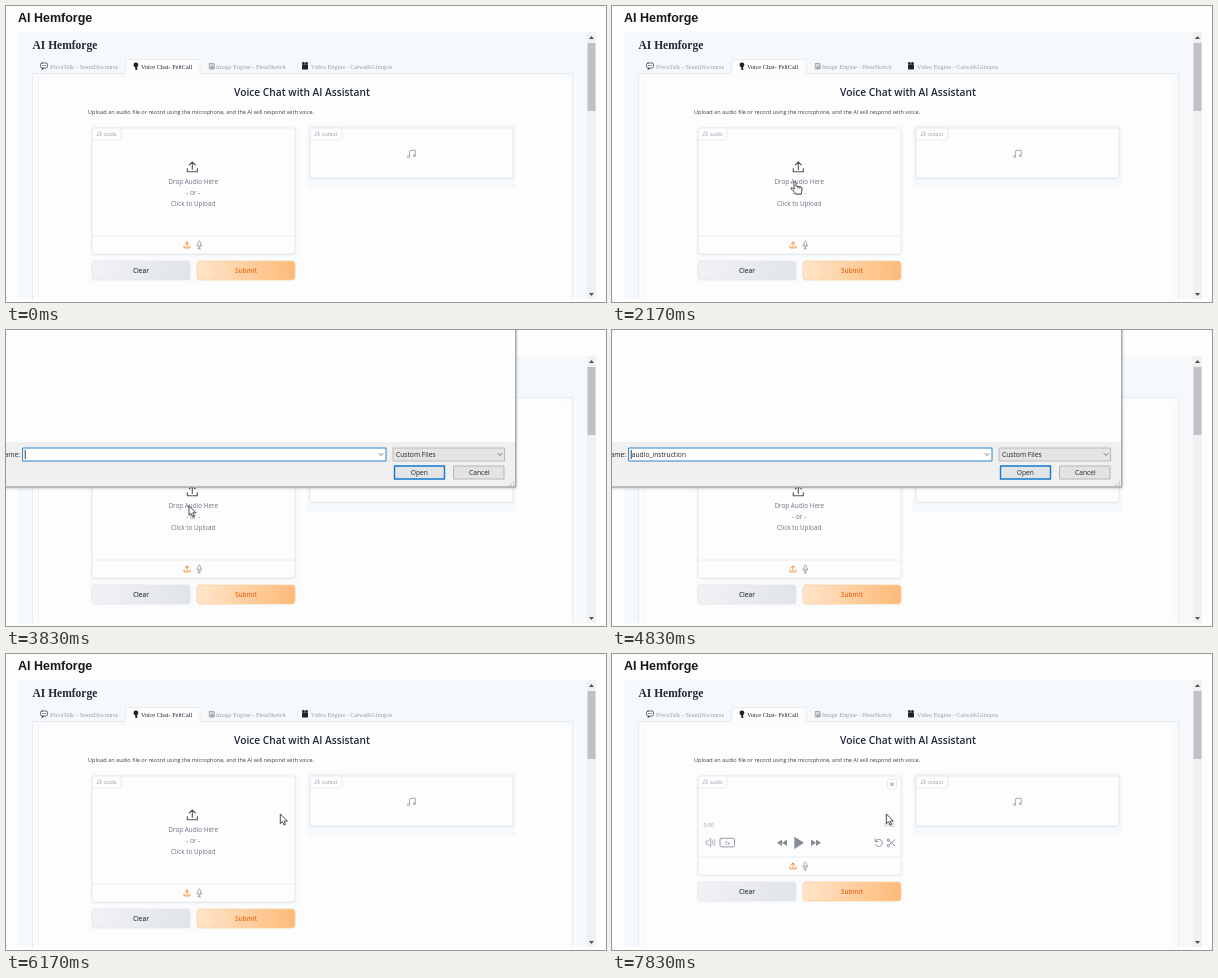
An HTML page with a canvas that plays this animation: 600x296 px, repeating every 8 s.

```html
<!DOCTYPE html>
<html lang="en">
<head>
<meta charset="utf-8">
<title>Voice chat demo</title>
<style>
html, body { margin: 0; width: 100%; height: 100%; overflow: hidden; background: #fdfdfe; }
canvas { display: block; width: 600px; height: 296px; }
</style>
</head>
<body>
<canvas id="stage"></canvas>
<script>
const W = 600, H = 296, LOOP = 8000;
const SANS = '"Open Sans", "Noto Sans", sans-serif';
const SERIF = '"Liberation Serif", "Noto Serif", serif';
const ARIAL = '"Liberation Sans", sans-serif';
const GRAY = '#9a9eaa', ORANGE = '#f08a24', LINE = '#e3e7ec';

const canvas = document.getElementById('stage');
const c = canvas.getContext('2d');
const scale = window.devicePixelRatio || 1;
canvas.width = W * scale;
canvas.height = H * scale;

function text(str, x, y, size, color, opt = {}) {
  c.font = `${opt.weight || 400} ${size}px ${opt.family || SANS}`;
  c.textAlign = opt.align || 'left';
  c.fillStyle = color;
  c.fillText(str, x, y);
}

function rect(x, y, w, h, fill) {
  c.fillStyle = fill;
  c.fillRect(x, y, w, h);
}

function box(x, y, w, h, r, fill, stroke, lw = 1) {
  c.beginPath();
  c.roundRect(x, y, w, h, r);
  if (fill) { c.fillStyle = fill; c.fill(); }
  if (stroke) { c.strokeStyle = stroke; c.lineWidth = lw; c.stroke(); }
}

function stroke(path, color, lw = 1) {
  c.strokeStyle = color;
  c.lineWidth = lw;
  c.lineCap = c.lineJoin = 'round';
  c.stroke(new Path2D(path));
}

function fill(path, color) {
  c.fillStyle = color;
  c.fill(new Path2D(path));
}

function at(x, y, k, draw) {
  c.save();
  c.translate(x, y);
  c.scale(k, k);
  draw();
  c.restore();
}

function dot(x, y, r, color) {
  c.beginPath();
  c.arc(x, y, r, 0, Math.PI * 2);
  c.fillStyle = color;
  c.fill();
}

function ring(x, y, r, color, lw) {
  c.beginPath();
  c.arc(x, y, r, 0, Math.PI * 2);
  c.strokeStyle = color;
  c.lineWidth = lw;
  c.stroke();
}

// Icons, centred on (x, y)
function note(x, y, k) {
  at(x, y, k, () => {
    stroke('M-2 3V-3.2L4 -4V2', GRAY, 0.9);
    ring(-3.1, 3, 1.1, GRAY, 0.9);
    ring(2.9, 2, 1.1, GRAY, 0.9);
  });
}

function upload(x, y, k, color, lw) {
  at(x, y, k, () => stroke('M0 2.5V-5M-3 -2.2L0 -5L3 -2.2M-5 1.5V4.8H5V1.5', color, lw));
}

function mic(x, y) {
  box(x - 1.2, y - 3.8, 2.4, 4.8, 1.2, null, GRAY, 0.8);
  stroke(`M${x - 2.5} ${y - 0.5}a2.5 2.6 0 0 0 5 0M${x} ${y + 2.2}v1.6M${x - 1.3} ${y + 3.8}h2.6`, GRAY, 0.8);
}

function tabIcons() {
  box(34.5, 57, 7, 5, 1.5, '#fff', '#444', 0.8);
  fill('M36 62L35.5 64.5L38.5 62Z', '#444');
  for (let i = 0; i < 3; i++) dot(36.3 + i * 1.7, 59.5, 0.5, '#333');
  fill('M128 57Q132.5 55.5 132.3 59.5L131.2 61V64H129.3V61.5Q126.8 60.5 128 57Z', '#222');
  box(203.3, 57.5, 5, 5.5, 0.5, '#d9dade', '#999', 0.8);
  fill('M204 62.5L206 59.5L208 62.5Z', '#999');
  box(296, 58.5, 6, 5, 0.8, '#222');
  dot(297.4, 57.5, 1.4, '#222');
  dot(300.5, 57.5, 1.4, '#222');
}

function frame() {
  rect(0, 0, W, H, '#fdfdfe');
  text('AI Hemforge', 12, 15.5, 12.5, '#18181c', { weight: 700, family: ARIAL });
  rect(12, 26, 569, 267, '#f6f9fc');
  text('AI Hemforge', 26.5, 43, 11.5, '#1f2937', { weight: 700, family: SERIF });

  rect(26.5, 67, 540, 226, '#fafbfd');
  rect(32, 72, 529, 221, '#fdfdfe');
  stroke('M26.5 293V67.5H566.5V293', LINE, 0.8);
  stroke('M32.5 293V72', '#eff2f6', 0.8);
  box(119.5, 53.5, 75, 14.5, [2, 2, 0, 0], '#fdfdfe');
  stroke('M119.5 67V55.5q0 -2 2 -2H192q2 0 2 2V67', LINE, 0.8);
  tabIcons();
  const tab = (s, x, color) => text(s, x, 62.5, 6.25, color, { family: SERIF });
  tab('PivraTalk - SeamDiscourse', 44, GRAY);
  tab('Voice Chat- FeltCall', 135, '#1f2937');
  tab('Image Engine - PleatSketch', 210, GRAY);
  tab('Video Engine - CatwalkGlimpse', 305, GRAY);

  rect(581, 26, 9, 267, '#f1f1f2');
  rect(581.5, 37, 8, 68, '#c1c1c3');
  fill('M583 33L585.5 30L588 33Z', '#505050');
  fill('M583 287L585.5 290L588 287Z', '#505050');

  text('Voice Chat with AI Assistant', 296, 90, 10.2, '#1f2937', { weight: 600, align: 'center' });
  text('Upload an audio file or record using the microphone, and the AI will respond with voice.',
    82, 108, 5.56, '#374151');
}

function block(x, y, w, h, label, labelW) {
  c.save();
  c.shadowColor = 'rgba(0,0,0,.1)';
  c.shadowBlur = 2 * scale;
  c.shadowOffsetY = 0.5 * scale;
  box(x, y, w, h, 2.5, '#fdfdfe');
  c.restore();
  box(x, y, w, h, 2.5, null, LINE, 0.8);
  box(x, y, labelW, 12, [2.5, 0, 2.5, 0], '#fdfdfe', LINE, 0.8);
  note(x + 7, y + 6, 0.5);
  text(label, x + 12, y + 7.7, 4.85, GRAY);
}

function button(x, y, label, from, to, edge, color) {
  const g = c.createLinearGradient(x, y, x + 98, y + 19);
  g.addColorStop(0, from);
  g.addColorStop(1, to);
  box(x, y, 98, 19, 3, g, edge, 0.8);
  text(label, x + 49, y + 11.8, 6.4, color, { weight: 600, align: 'center' });
}

function dropZone() {
  upload(186.3, 161, 1, '#4b5563', 1.1);
  const line = (s, y) => text(s, 187.2, y, 6.35, '#6b7280', { align: 'center' });
  line('Drop Audio Here', 178.3);
  line('- or -', 189);
  line('Click to Upload', 199.7);
}

function uploading() {
  text('Uploading 1 file...', 187, 152.8, 6.45, '#4b5563', { align: 'center' });
  ring(150.3, 163.2, 2.7, ORANGE, 1.1);
  text('audio_instruction.mp3', 156, 165.3, 6.5, GRAY);
}

function player() {
  box(275.5, 125.5, 9, 9.5, 1.5, '#fdfdfe', LINE, 0.8);
  stroke('M278.8 129l2.6 2.6M281.4 129l-2.6 2.6', '#6b7280', 0.8);
  text('0:00', 91.5, 173.3, 5.2, GRAY);
  text('0:00', 282.5, 173.3, 5.2, GRAY, { align: 'right' });
  stroke('M94.5 187h1.7l2.6 -2.4v8l-2.6 -2.4h-1.7zM100.4 186.7q1.3 1.8 0 3.7M102 185.3q2.2 3.3 0 6.5', GRAY, 0.8);
  box(108, 184.3, 14.5, 8.6, 1.5, null, '#8b909c', 0.9);
  text('1x', 115.2, 190.5, 5, '#6b7280', { align: 'center' });
  fill('M170 185.5V192L165 188.8ZM175 185.5V192L170 188.8Z', '#868b98');
  fill('M182.3 182.7V195L192 188.8Z', '#868b98');
  fill('M199 185.5V192L204 188.8ZM204 185.5V192L209 188.8Z', '#868b98');
  stroke('M263.3 185v2.6h2.6M263.6 187.3a3.6 3.6 0 1 1 0 3.2', '#868b98', 0.9);
  stroke('M277.5 187L282.8 191.8M277.5 190.6L282.8 185.6', '#868b98', 0.9);
  ring(276.4, 186, 1.2, '#868b98', 0.9);
  ring(276.4, 191.6, 1.2, '#868b98', 0.9);
}

function app(t) {
  frame();
  const bottom = t < 6500 ? 248 : t < 7830 ? 212 : 221;
  box(82.5, 118.5, 210, bottom - 89.5, 3, '#f9fbfd');
  block(86, 122, 203, bottom - 122, 'audio', 29);
  stroke(`M86 ${bottom - 18}H289`, LINE, 0.8);
  upload(181, bottom - 9, 0.6, ORANGE, 1.5);
  mic(193.3, bottom - 9);
  button(86, bottom + 7, 'Clear', '#f1f2f4', '#e1e4e8', '#e1e4e9', '#374151');
  button(191, bottom + 7, 'Submit', '#ffe6cc', '#fdb976', '#fbcf9f', '#ea6a1c');
  (t < 6500 ? dropZone : t < 7830 ? uploading : player)();

  box(300.5, 118.5, 209, 64, 3, '#f6f9fc');
  block(304, 122, 203, 50, 'output', 32);
  note(405.5, 147.8, 0.95);
}

function dialog(t) {
  c.save();
  c.shadowColor = 'rgba(0,0,0,.25)';
  c.shadowBlur = 3 * scale;
  rect(-5, -5, 515, 162.5, '#f0f0f1');
  c.restore();
  rect(0, 0, 509.5, 112, '#fdfdfe');
  stroke('M-2 157H509.8V-2', '#8c8c90', 1);

  if (t >= 3500) text('File name:', 14, 126.7, 6.7, '#222', { align: 'right' });
  box(17, 118, 363, 13, 0, '#fff', '#2f83c8', 1);
  box(387.5, 118, 111, 13, 0, '#e4e4e5', '#b4b4b6', 0.9);
  box(388.5, 136, 50, 13, 0, '#e3e4e6', '#1379d0', 1.4);
  box(448, 136, 50, 13, 0, '#e3e3e4', '#b0b0b2', 0.9);
  stroke('M373 123.5l2 2l2 -2M492 123.5l2 2l2 -2', '#555', 0.8);
  text('Custom Files', 390, 126.7, 6.7, '#222');
  text('Open', 413.3, 144.5, 6.7, '#222', { align: 'center' });
  text('Cancel', 473.3, 144.5, 6.7, '#222', { align: 'center' });
  for (let i = 0; i < 3; i++)
    for (let j = 0; j <= i; j++) rect(503 + i * 2, 155 - j * 2, 1, 1, '#b5b5b8');

  if (t >= 4830) text('audio_instruction', 19.8, 126.9, 6.7, '#222');
  const blinkOff = (t >= 4330 && t < 4830) || (t >= 5330 && t < 5670);
  if (!blinkOff) rect(18.8, 120, 0.8, 9, '#111');
}

function arrow(x, y) {
  at(x, y, 1, () => {
    const p = 'M0 0V9.4L2.2 7.4L3.7 10.8L5.2 10.1L3.8 6.8H6.7Z';
    fill(p, '#fff');
    stroke(p, '#222', 0.8);
  });
}

function hand(x, y) {
  at(x, y, 1, () => {
    const p = 'M-1 1q1 -1.6 2 0V5l5 1q1.4 .4 1.2 2L6.5 10.5V13H0V11.5L-4 7.8q-.3 -1.6 1.3 -1L-1 8Z';
    fill(p, '#fff');
    stroke(p, '#222', 0.8);
    stroke('M2.9 5.4v2M4.9 5.8v1.8', '#222', 0.6);
  });
}

const ease = (t, a, b) => {
  const k = Math.min(1, Math.max(0, (t - a) / (b - a)));
  return k * k * (3 - 2 * k);
};

function pointer(t) {
  if (t < 330) return;
  if (t < 2830) {
    const k = ease(t, 330, 670);
    hand(160 + 23 * k, 125 + 50 * k);
  } else if (t < 4170) {
    const k = ease(t, 3900, 4170), y = 176 - 90 * k;
    if (y > 112) arrow(183 + 30 * k, y);
  } else if (t >= 6170) {
    arrow(274.3, 160.3);
  }
}

function draw(now) {
  const t = now % LOOP;
  c.setTransform(scale, 0, 0, scale, 0, 0);
  app(t);
  if (t >= 3330 && t < 6170) dialog(t);
  pointer(t);
}

const start = performance.now();
function tick() {
  draw(performance.now() - start);
  requestAnimationFrame(tick);
}
tick();
</script>
</body>
</html>
```
